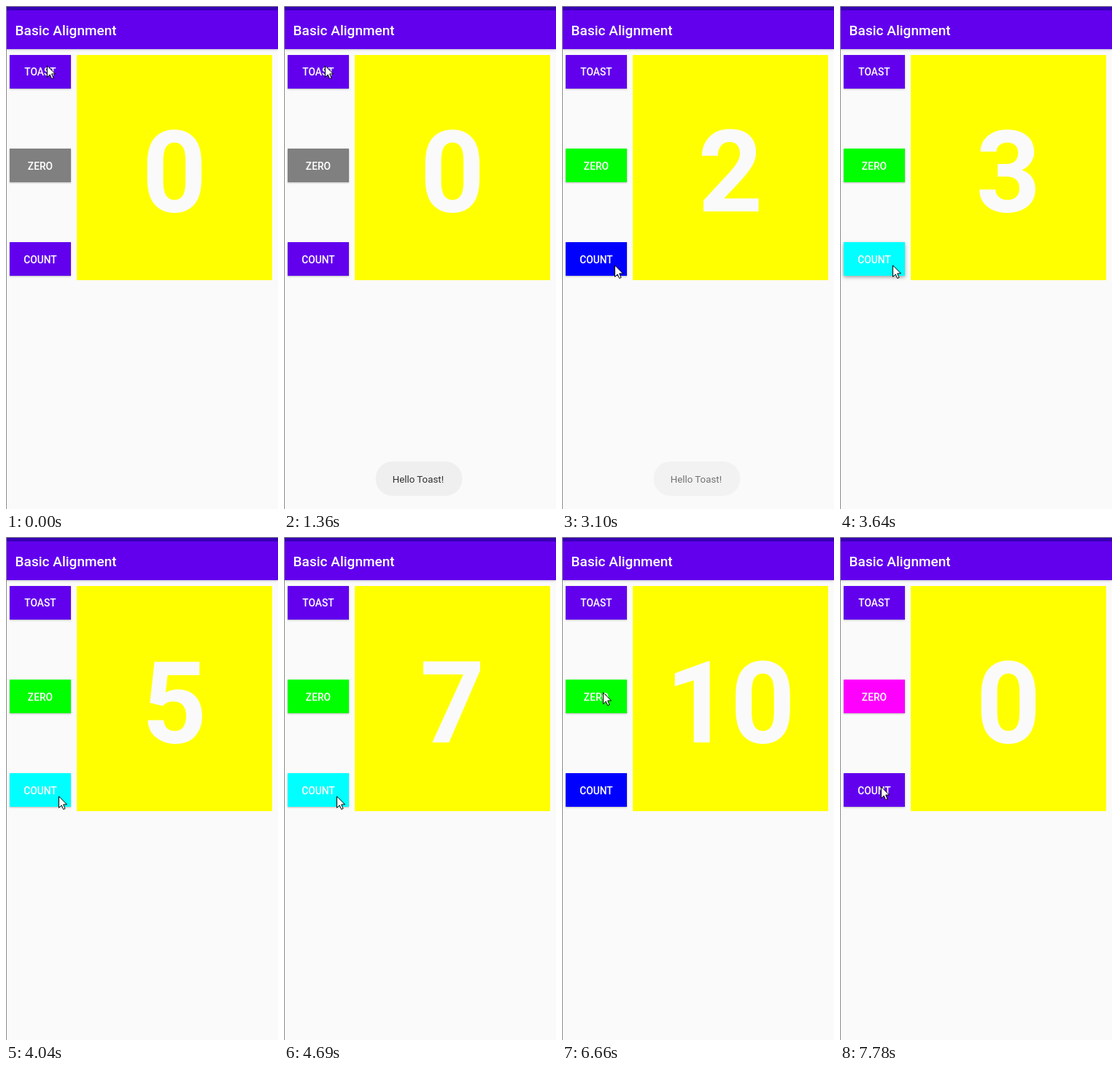
These frames come from a looping animation (373 px wide and 688 px high, 8 s). An HTML page:

```html
<!DOCTYPE html>
<html lang="en">
<head>
<meta charset="utf-8">
<title>Counter app</title>
<style>
  html, body { margin: 0; width: 100%; height: 100%; overflow: hidden; background: #fafafa; }
  svg { display: block; width: 373px; height: 688px; }
  text { font-family: Roboto, "Liberation Sans", sans-serif; fill: #fafafa; }
  .title { font-size: 19px; font-weight: 500; fill: #fff; }
  .label { font-size: 13.8px; font-weight: 500; text-anchor: middle; fill: #fff; }
  #digits { font-size: 155px; font-weight: 700; text-anchor: middle; }
  #toast text { font-size: 13.3px; fill: #303030; }
  .bar { filter: drop-shadow(0 1px 1.5px rgba(0, 0, 0, .2)); }
  .button { filter: drop-shadow(0 1px 1px rgba(0, 0, 0, .25)); }
  .button.raised { filter: drop-shadow(0 2px 2.5px rgba(0, 0, 0, .35)); }
</style>
</head>
<body>
<svg viewBox="0 0 373 688">
  <rect width="373" height="688" fill="#fafafa"/>
  <rect class="bar" y="5" width="373" height="54" fill="#6200ee"/>
  <rect width="373" height="6" fill="#3700b3"/>
  <text class="title" x="12.6" y="40.3">Basic Alignment</text>

  <rect x="97" y="67" width="268" height="308" fill="#ff0"/>
  <text id="digits" x="231" y="280.8">0</text>

  <g id="toastButton" transform="translate(5 67)">
    <rect class="button" width="84" height="46" fill="#6200ee"/>
    <text class="label" x="42" y="28.3">TOAST</text>
  </g>
  <g transform="translate(5 195)">
    <rect class="button" id="zero" width="84" height="46"/>
    <text class="label" x="42" y="28.5">ZERO</text>
  </g>
  <g transform="translate(5 323)">
    <rect class="button" id="count" width="84" height="46"/>
    <text class="label" x="42" y="28.7">COUNT</text>
  </g>

  <g id="toast">
    <rect x="125.7" y="623" width="118.6" height="47" rx="23" fill="#efefef"/>
    <text x="148.7" y="651.5">Hello Toast!</text>
  </g>

  <path d="M.5 0V688M0 .5H373" stroke="#8c8c8c" fill="none"/>
  <path id="cursor" d="M.5 .8V16.4L4.2 12.9L6.7 18.5L9.1 17.5L6.7 11.9H11.5Z"
        fill="#fff" stroke="#000" stroke-linejoin="round"/>
</svg>
<script>
const LOOP = 8000;
const RESET = 7200;
const $ = id => document.getElementById(id);

// Runs of clicks on COUNT; the button is held and released for equal times.
const runs = [
  { from: 2670, clicks: 3, hold: 140 },
  { from: 3640, clicks: 3, hold: 132 },
  { from: 4690, clicks: 1, hold: 0 },
  { from: 4960, clicks: 2, hold: 180 },
  { from: 5900, clicks: 1, hold: 120 },
];
const clicks = runs.flatMap(({ from, clicks, hold }) =>
  Array.from({ length: clicks }, (_, i) => ({ down: from + 2 * i * hold, up: from + (2 * i + 1) * hold })));

// Pointer stops over the buttons; bow bends the path sideways.
const home = { x: 56, y: 81 };
const glides = [
  { from: 1660, to: 2240, n: 5, x: 72, y: 354, bow: -15 },
  { from: 6180, to: 6660, n: 4, x: 56, y: 212, bow: 0 },
  { from: 7340, to: 7780, n: 4, x: 56, y: 341, bow: 0 },
];

// Progress 0..1 in n equal jumps, the first at "from" and the last at "to".
function stepped(t, from, to, n) {
  const jump = Math.floor((t - from) / (to - from) * (n - 1)) + 1;
  return Math.min(n, Math.max(0, jump)) / n;
}

function pointer(t) {
  return glides.reduce((p, g) => {
    const k = stepped(t, g.from, g.to, g.n);
    return {
      x: p.x + (g.x - p.x) * k + g.bow * Math.sin(Math.PI * k),
      y: p.y + (g.y - p.y) * k,
    };
  }, home);
}

function draw(t) {
  const n = t < RESET ? clicks.filter(c => c.up <= t).length : 0;
  const { x, y } = pointer(t);
  $("digits").textContent = n;
  $("zero").setAttribute("fill", n ? "#0f0" : t < RESET ? "#808080" : "#f0f");
  $("count").setAttribute("fill", !n ? "#6200ee" : n % 2 ? "#0ff" : "#00f");
  $("count").classList.toggle("raised", clicks.some(c => c.down <= t && t < c.up));
  $("toast").setAttribute("opacity", stepped(t, 970, 1360, 3) - stepped(t, 3100, 3370, 3));
  $("cursor").setAttribute("transform", `translate(${Math.round(x)} ${Math.round(y)})`);
}

const start = performance.now();
function tick() {
  draw((performance.now() - start) % LOOP);
  requestAnimationFrame(tick);
}
tick();
</script>
</body>
</html>
```
